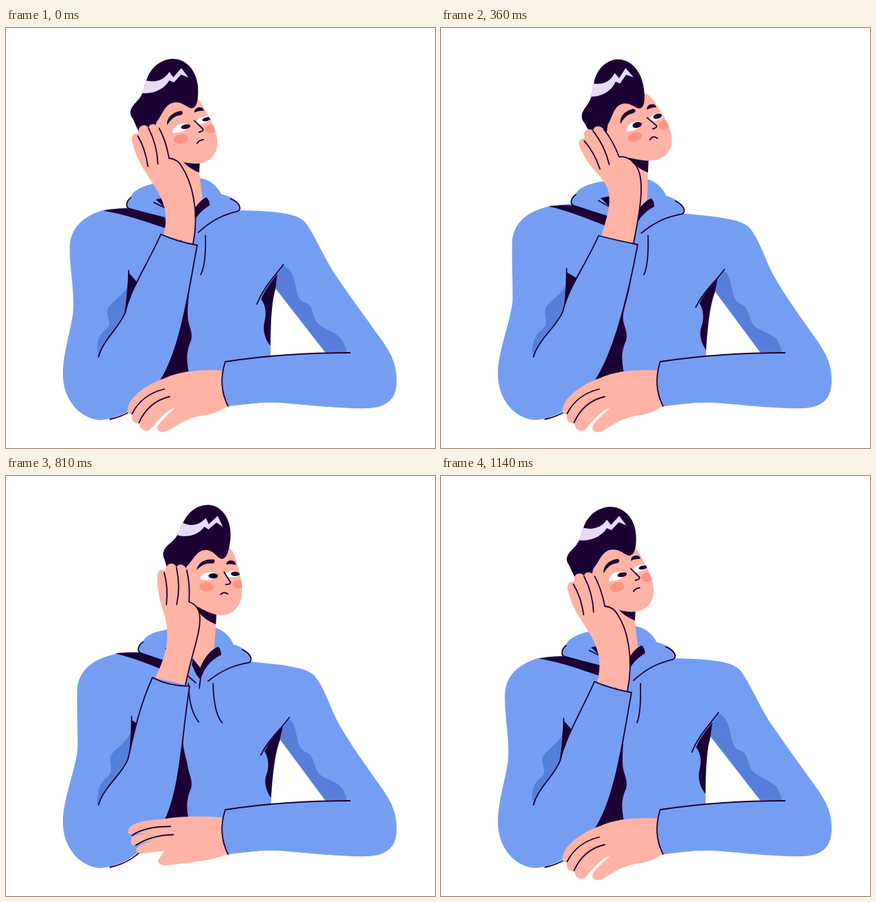
Animation, 626 px wide and 613 px high, one loop 1170 ms. Source, as an HTML page with a canvas:

```html
<!DOCTYPE html>
<html lang="en">
<head>
<meta charset="utf-8">
<title>Daydreamer</title>
<style>
html, body { margin: 0; width: 100%; height: 100%; overflow: hidden; background: #fff; }
canvas { display: block; width: 626px; height: 613px; }
</style>
</head>
<body>
<canvas id="stage" width="626" height="613"></canvas>
<script>
const ctx = document.getElementById('stage').getContext('2d');
const LOOP = 1170, STEP = 30, HOOD_LAG = 25;
const INK = '#1c0034', BLUE = '#759ef2', SHADE = '#567fdc', SKIN = '#ffb3a5',
      BLUSH = '#ff9384', GLOW = '#e7dafb', WHITE = '#fff';

// Pose keys in ms, joined by a smooth periodic curve
const KEYS = [0, 240, 360, 510, 690, 930, 1140];
const track = {
  hairL: [[181, 188, 205, 226, 237, 214, 183], [123, 133, 130, 122, 118, 108, 121]],
  hairT: [[241, 236, 254, 281, 300, 284, 245], [45, 48, 46, 44, 43, 42, 45]],
  hairP: [[272, 273, 291, 315, 324, 301, 276], [117, 117, 117, 121, 123, 118, 116]],
  cheek: [[255, 268, 283, 300, 303, 278, 257], [162, 159, 159, 161, 162, 161, 162]],
  neck: [[282, 291, 302, 312, 313, 297, 283], [211, 210, 211, 214, 217, 215, 211]],
  thumb: [[238, 248, 260, 273, 275, 256, 239], [190, 190, 188, 184, 183, 185, 190]],
  cuffL: [[226, 232, 230, 222, 215, 215, 224], [301, 304, 303, 300, 295, 295, 300]],
  cuffR: [[279, 288, 287, 279, 270, 269, 278], [317, 318, 316, 310, 307, 308, 316]]
};
const faceTilt = [-12.5, -18, -16, -8.5, 0, 0, -12];
const handTilt = [-14.6, -33, -25.5, -10, 0, -4.5, -15];
const wristBend = [11, 5, 12, 22, 26, 13, 10];
const cordTip = [284, 285, 296, 312, 320, 306, 286];
const cordSwing = [0, 0, 0, 0, 8, 18, 0];
const droop = [1, 0, 0, 0, 0, 1, 1];

// Two-pose shapes: leaning left, leaning right
const body = {
  torso: [
    'M145 265 C112 274 93 292 93 322 C93 352 100 385 98 414 C95 440 83 475 83 505 C83 546 112 572 138 572 C162 571 185 558 206 538 L232 512 L320 510 L324 552 C350 548 375 546 400 547 C450 551 490 556 530 555 C556 553 570 542 570 515 C570 490 562 476 550 458 C523 420 498 386 477 355 C460 326 450 302 437 284 C424 268 380 267 340 266 L180 262Z',
    'M165 258 C130 264 108 284 108 312 C107 345 107 370 107 392 C104 425 83 470 83 505 C83 546 112 572 138 572 C162 571 185 558 206 538 L232 512 L320 510 L324 552 C350 548 375 546 400 547 C450 551 490 556 530 555 C556 553 570 542 570 515 C570 490 562 476 550 458 C524 420 503 393 485 357 C473 328 467 306 454 293 C440 282 400 277 360 273 L199 254Z'],
  shadeL: [
    'M178 376 C170 392 150 402 148 412 C146 422 155 430 148 438 C134 448 131 460 135 479 C145 458 165 435 175 414Z',
    'M184 372 C178 392 155 400 154 410 C152 422 158 430 150 438 C136 450 132 462 134 482 C146 458 170 440 181 413Z'],
  foldL: ['M179 357 L195 375 L174 416Z', 'M185 356 L199 361 L182 408Z'],
  lineL: ['M179 354 Q179 385 174 415', 'M185 350 Q186 380 182 408'],
  shadeR: [
    'M405 347 C415 350 420 362 423 378 C425 390 429 400 437 401 C448 403 447 420 454 430 C463 440 484 445 491 456 Q496 465 497 473 L466 473 L392 378 L396 360Z',
    'M417 358 C424 364 424 378 427 390 C430 402 436 402 442 406 C450 412 450 425 456 434 C464 444 484 445 491 456 Q496 465 497 473 L466 473 L401 385 L407 369Z'],
  gap: [
    'M386 478 C386 440 387 400 393 380 L466 474Z',
    'M387 478 C389 445 394 410 403 387 L466 474Z'],
  foldR: [
    'M396 359 C386 372 378 382 372 396 C380 405 380 418 377 430 C374 442 379 456 386 464 C386 440 387 400 393 382Z',
    'M407 368 C396 380 386 390 379 404 C384 412 386 425 382 436 C376 448 380 462 387 472 C390 440 393 410 402 387Z'],
  lineR: ['M405 345 C390 365 375 380 366 403', 'M417 355 C402 375 385 388 374 409']
};

// Resting hand: down, raised, spread
const rest = {
  skin: [
    'M320 500 C290 498 255 500 232 511 C205 520 182 538 178 553 C176 562 180 565 184 563 C184 563 184 563 184 563 C184 563 184 563 184 563 C182 572 186 578 194 576 C194 576 194 576 194 576 C194 576 194 576 194 576 C196 586 202 590 209 587 C218 580 228 562 246 554 C240 562 224 574 221 582 C220 591 230 591 236 588 C255 576 270 567 292 565 C305 563 316 557 324 551Z',
    'M320 498 C290 494 245 494 225 500 C205 503 180 508 172 518 C168 526 172 530 179 528 C179 528 179 528 179 528 C179 528 179 528 179 528 C178 535 182 538 186 536 C186 536 186 536 186 536 C186 536 186 536 186 536 C189 538 196 538 203 537 C206 540 212 542 216 545 C218 546 222 548 226 550 C232 552 238 553 244 555 C260 561 275 561 290 557 C303 554 316 553 324 551Z',
    'M320 500 C290 498 255 499 232 502 C215 500 190 502 187 510 C184 517 188 519 192 518 C208 513 225 514 240 516 C218 515 200 518 188 527 C183 535 185 542 190 542 C205 534 225 531 243 531 C220 532 205 540 194 552 C188 558 190 565 196 565 C212 560 228 553 245 550 C238 562 220 570 218 577 C218 585 226 584 232 581 C255 570 275 566 292 565 C305 563 316 557 324 551Z'],
  lines: [
    'M184 563 Q198 535 231 527 M194 576 Q208 545 239 538',
    'M181 522 Q200 506 237 507 M188 524 Q212 513 245 516',
    'M187 527 Q205 517 243 516 M191 554 Q210 536 243 531']
};
const restKeys = [[0, 0], [510, 0], [690, 1], [930, 2], [1080, 0], [1170, 0]];

const hair = 'M240 128 C235 120 237 112 247 103 C258 93 258 85 264 70 C272 50 287 43 300 43 C320 44 334 65 334 90 C334 108 331 122 324 123 C318 124 312 111 300 111 C285 111 281 130 273 137 L265 162 L247 150Z';
const gleam = 'M263 72 C276 77 287 75 296 63 L301 72 L313 59 L322 75 L312 69 L301 80 L295 76 C287 89 270 95 254 90 C259 85 261 78 263 72Z';
const face = 'M31 -58 C40 -52 42 -40 45 -30 C48 -20 53 -6 52 10 C51 28 39 41 22 41 C3 40 -13 28 -27 22 L-40 0 L-36 -27 L-18 -52Z';
const fingers = 'M0 0 C1 -12 1 -22 0 -32 C-1 -42 -3 -52 -10 -54 C-14 -55 -17 -53 -18 -50 C-19 -57 -32 -60 -34 -46 C-40 -49 -46 -46 -46 -36 C-46 -18 -44 -5 -38 12Z';

const mod = (a, n) => (a % n + n) % n;
const lerp = (a, b, k) => a + (b - a) * k;
const sway = t => (1 - Math.cos(2 * Math.PI * t / LOOP)) / 2;

function at(v, t) {
  const n = KEYS.length;
  let i = n - 1;
  while (KEYS[i] > t) i--;
  const time = k => KEYS[mod(k, n)] + LOOP * Math.floor(k / n);
  const val = k => v[mod(k, n)];
  const span = k => time(k + 1) - time(k);
  const slope = k => (val(k + 1) - val(k)) / span(k);
  const tangent = k => (slope(k - 1) * span(k) + slope(k) * span(k - 1)) / (span(k - 1) + span(k));
  const h = span(i), u = (t - time(i)) / h, w = 1 - u;
  return val(i) * w * w * (1 + 2 * u) + val(i + 1) * u * u * (3 - 2 * u)
    + h * u * w * (tangent(i) * w - tangent(i + 1) * u);
}

function morph(a, b, k) {
  const to = b.match(/-?[\d.]+/g);
  let i = 0;
  return a.replace(/-?[\d.]+/g, n => lerp(+n, +to[i++], k).toFixed(2));
}

function shape(d, m) {
  const p = new Path2D(d);
  if (!m) return p;
  const q = new Path2D();
  q.addPath(p, m);
  return q;
}
function fill(d, color, m) {
  ctx.fillStyle = color;
  ctx.fill(shape(d, m));
}
function line(d, m, width = 1.8) {
  ctx.lineWidth = width;
  ctx.stroke(shape(d, m));
}
function oval(x, y, rx, ry, color) {
  ctx.fillStyle = color;
  ctx.beginPath();
  ctx.ellipse(x, y, rx, ry, 0, 0, 7);
  ctx.fill();
}
const place = (p, deg) => new DOMMatrix().translate(p[0], p[1]).rotate(deg);
const xy = (m, x, y) => {
  const p = m.transformPoint({ x, y });
  return [p.x, p.y];
};

// Affine map taking the hair's rest anchors to L, T, P
function hairMatrix(L, T, P) {
  const basis = (l, t, p) =>
    new DOMMatrix([l[0] - t[0], l[1] - t[1], p[0] - t[0], p[1] - t[1], t[0], t[1]]);
  return basis(L, T, P).multiply(basis([237, 118], [300, 43], [324, 123]).inverse());
}

function drawBody(s, pose, hood, t) {
  const b = k => morph(body[k][0], body[k][1], s / .94);
  fill('M204 243 C206 234 218 226 245 223 L306 221 C320 223 332 234 337 247 C350 251 363 260 363 268 C363 274 356 276 340 278 L300 300 L210 270 C196 258 196 250 204 243Z', BLUE, hood);
  fill(b('torso'), BLUE);
  fill(b('shadeL'), SHADE);
  fill(b('foldL'), INK);
  line(b('lineL'));
  fill(b('shadeR'), SHADE);
  fill(b('gap'), WHITE);
  fill(b('foldR'), INK);
  line(b('lineR'));
  line('M152 571 C172 567 192 556 210 534');

  const n = pose.neck, x = n[0], y = n[1];
  fill(`M${x - 34} ${y - 30} L${x} ${y - 30} L${n} L${xy(hood, 309, 252)} L${xy(hood, 297, 267)} L${xy(hood, 288, 283)} L${xy(hood, 270, 260)}Z`, SKIN);
  fill(`M${n} L${x + 1} ${y - 20} L${x - 31} ${y - 27} C${x - 24} ${y - 13} ${x - 14} ${y - 6} ${n}Z`, INK);

  fill('M164 257 C180 255 195 256 203 257 L252 274 L254 291 C222 277 195 265 164 257Z', INK, hood);
  fill('M241 247 L254 245 L258 265Z', INK, hood);
  line('M238 251 L258 263', hood);
  fill('M277 266 L288 280 C294 265 305 253 315 250 Q319 254 319 262 C302 270 293 282 288 298 L282 290 L276 276Z', INK, hood);
  line('M288 297 L286 310 M270 292 L281 302', hood);
  line('M205 241 C196 248 196 256 204 258 L252 276', hood);
  line('M350 255 C362 261 366 271 359 274 C335 278 320 284 299 300', hood);

  const cord = 291 + 16.5 * s, tip = at(cordTip, t), left = cord - 36;
  line(`M${cord} 303 Q${cord + 1} 346 ${tip} 360`);
  line(`M${left} 303 Q${left + 1} 342 ${left + at(cordSwing, t)} 359`);
}

function drawHead(pose, tilt, m) {
  const f = place(pose.cheek, tilt);
  fill(face, SKIN, f);
  ctx.save();
  ctx.clip(shape(face, f));
  ctx.transform(f.a, f.b, f.c, f.d, f.e, f.f);
  oval(0, 0, 10.5, 7, BLUSH);
  oval(46, -5, 8.5, 6.5, BLUSH);
  fill('M-10 -11 C-8 -20 4 -24 14 -20 C18 -14 8 -7 -10 -11Z', WHITE);
  fill('M26 -18 C30 -24 38 -26 46 -24 L47 -17 C40 -14 30 -14 26 -18Z', WHITE);
  oval(8 + 3 * m, -16, 7, 4.2 - .9 * m, INK);
  oval(40 + 3 * m, -20, 6.5, 3.6 - .8 * m, INK);
  fill('M-15 -24 C-14 -34 -4 -41 9 -40 C13 -38 11 -34 7 -34 C-2 -35 -8 -31 -15 -24Z', INK);
  fill('M28 -33 C28 -40 37 -41 41 -37 L42 -33 C37 -34 32 -35 28 -33Z', INK);
  line('M25 -22 L35 -7 Q35 -4 28 -4');
  line(morph('M20 10 Q26 4 31 11', 'M22 11.5 Q25 7.5 32 8', m));
  ctx.restore();

  const h = hairMatrix(pose.hairL, pose.hairT, pose.hairP);
  fill(hair, INK, h);
  fill(gleam, GLOW, h);
}

function drawArm(s, pose, tilt, bend) {
  const [ax, ay] = pose.cuffL, [bx, by] = pose.cuffR;
  const h = place(pose.thumb, tilt), pt = (x, y) => xy(h, x, y);

  fill(`M${bx - 9} 362 C${bx - 13} 395 264 412 266 428 C268 438 273 445 270 456 C262 475 264 485 267 504 L225 516 L240 400Z`, INK);

  const heel = `C${pt(8, 3)} ${pt(13, 8)} ${pt(15, 17)} C${pt(19 - tilt * .25, 40)} ${bx + 4} ${by - 52} ${bx - 6} ${by - 2}`;
  fill(`M${pt(0, 0)} ${heel} L${ax + 4} ${ay + 1} C${ax + 4 + bend} ${ay - 40} ${pt(-28, 45)} ${pt(-38, 12)} L${pt(-30, -15)}Z`, SKIN);
  fill(fingers, SKIN, h);
  line('M-36 -43 Q-30 -22 -33 4 M-18 -50 Q-12 -23 -18 4 M-3 -46 C1 -30 1 -14 0 0', h);
  line(`M${pt(0, 0)} ${heel}`);

  const px = 174 + 6 * s, py = 415 - 3 * s;
  const cuff = `Q${(ax + bx) / 2 - 2} ${(ay + by) / 2 + 7 + tilt * .25} ${bx} ${by}`;
  const front = `C${bx - 12} 380 255 470 225 515`;
  const back = `C142 454 ${px - 8} ${py + 22} ${px} ${py} C${px + 8} ${py - 35} ${ax - 20} ${ay + 45} ${ax} ${ay}`;
  fill(`M${ax} ${ay} ${cuff} ${front} L190 530 L135 480 ${back}Z`, BLUE);
  line(`M${bx} ${by} ${front}`);
  line(`M135 480 ${back} ${cuff}`);
}

function drawRest(t) {
  let i = 0;
  while (restKeys[i + 1][0] <= t) i++;
  const [t0, a] = restKeys[i], [t1, b] = restKeys[i + 1];
  const u = (t - t0) / (t1 - t0), k = u * u * (3 - 2 * u);
  fill(morph(rest.skin[a], rest.skin[b], k), SKIN);
  line(morph(rest.lines[a], rest.lines[b], k));
  fill('M320 487 C313 508 313 530 324 552 L370 547 L370 481Z', BLUE);
  line('M324 552 C313 530 313 508 320 487 C380 478 440 474 502 474');
}

function draw(t) {
  const s = sway(t);
  const hood = new DOMMatrix().translate(270, 520)
    .rotate((sway(t - HOOD_LAG) - .955) * 5).translate(-270, -520);
  const pose = {};
  for (const k in track) pose[k] = track[k].map(v => at(v, t));
  const m = Math.min(1, Math.max(0, at(droop, t)));

  ctx.fillStyle = WHITE;
  ctx.fillRect(0, 0, 626, 613);
  ctx.strokeStyle = INK;
  ctx.lineCap = ctx.lineJoin = 'round';
  drawBody(s, pose, hood, t);
  drawHead(pose, at(faceTilt, t), m);
  drawArm(s, pose, at(handTilt, t), at(wristBend, t));
  drawRest(t);
}

const start = performance.now();
function tick() {
  const t = mod(performance.now() - start, LOOP);
  draw(Math.floor(t / STEP) * STEP);
  requestAnimationFrame(tick);
}
tick();
</script>
</body>
</html>
```
